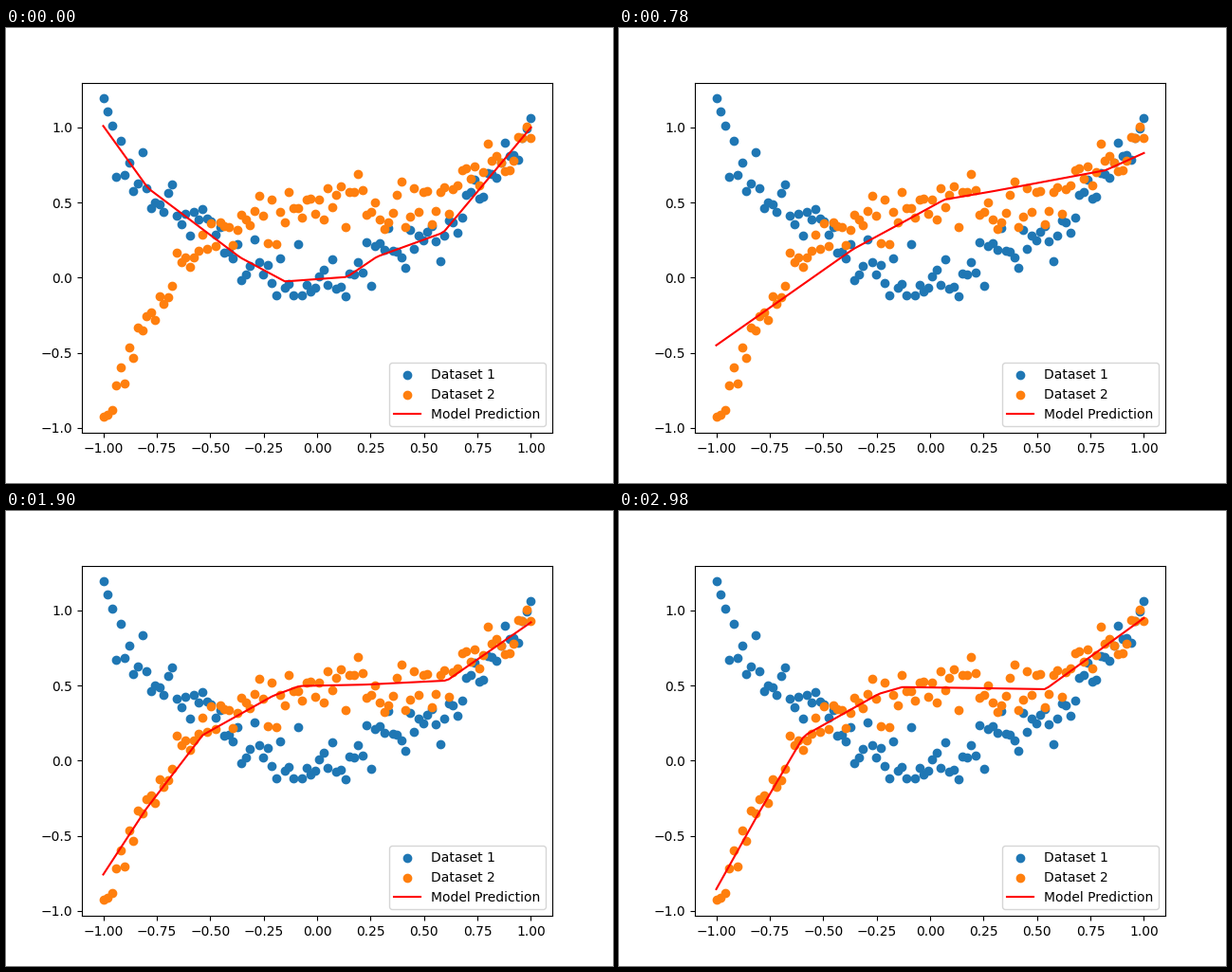
Write a matplotlib script that moves like this. It is 640x480 px and loops after 3 s.

```python
import numpy as np
import matplotlib.pyplot as plt
from matplotlib.animation import FuncAnimation

FRAMES = 150
TURN = 39  # frame where the quick swing gives way to slow refinement
rng = np.random.RandomState(42)


def uniform(n):
    return rng.randint(2**24, size=n, dtype=np.uint32) / 2**24


def box_muller(u):
    """Turn blocks of 16 uniforms into normals, cosine half then sine half."""
    a, b = u.reshape(-1, 2, 8).transpose(1, 0, 2)
    r, t = np.sqrt(-2 * np.log(1 - a)), 2 * np.pi * b
    return np.hstack([r * np.cos(t), r * np.sin(t)]).ravel()


def normal(n):
    u = uniform(n)
    z = np.empty(n)
    full = n - n % 16
    z[:full] = box_muller(u[:full])
    if n % 16:
        z[-16:] = box_muller(uniform(16))
    return z


def ease_out(s, power):
    return 1 - (1 - s)**power


x = np.linspace(-1, 1, 100)
y1 = x**2 + 0.1 * normal(100)
y2 = x**3 - 0.5 * x**2 + 0.5 + 0.1 * normal(100)

# Corners of the piecewise linear model: first fit, rough refit, final fit.
first = np.array([(-1, 1.01), (-.79, .595), (-.36, .135), (-.15, -.025),
                  (.14, .005), (.28, .14), (.59, .3), (1, 1)])
rough = np.array([(-1, -.45), (-.8, -.25), (-.36, .19), (-.1, .39),
                  (.067, .52), (.3, .577), (.82, .715), (1, .83)])
final = np.array([(-1, -.855), (-.8, -.345), (-.59, .165), (-.24, .445),
                  (-.13, .49), (.2, .484), (.54, .476), (1, .95)])


def predict(i):
    if i < TURN:
        p = ease_out(i / TURN, 2.5)
        corners = first + (rough - first) * p
        tilt = 0.36 * np.sin(np.pi * p)  # overshoot of the slope
    else:
        p = ease_out((i - TURN) / (FRAMES - 1 - TURN), 2)
        corners = rough + (final - rough) * p
        tilt = 0
    return np.interp(x, *corners.T) + tilt * x


fig, ax = plt.subplots(figsize=(6.4, 4.8), dpi=100)
ax.scatter(x, y1, label="Dataset 1")
ax.scatter(x, y2, label="Dataset 2")
line, = ax.plot([], [], color="red", label="Model Prediction")
ax.legend(loc="lower right")


def update(i):
    line.set_data(x, predict(i))
    return line,


anim = FuncAnimation(fig, update, frames=FRAMES, interval=20, repeat=True,
                     repeat_delay=0)
plt.show()
```
